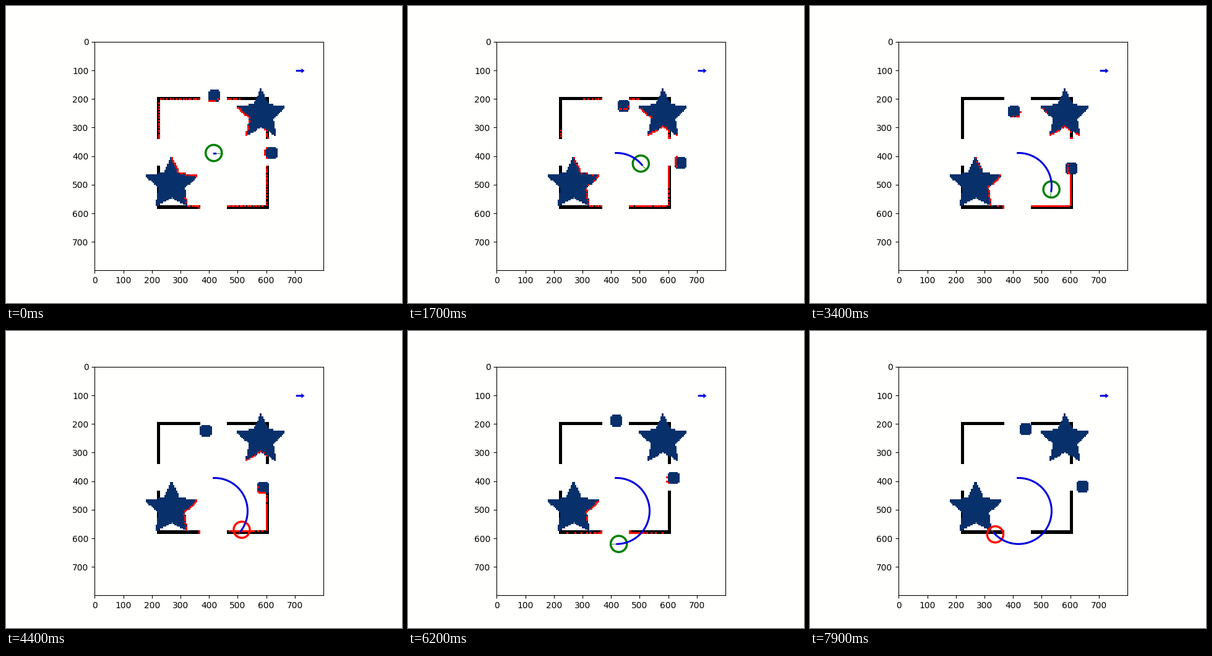
A matplotlib script for the animation above (8 s loop, 640 px wide and 480 px high).

```python
import numpy as np
import matplotlib.pyplot as plt
from matplotlib.animation import FuncAnimation
from matplotlib.patches import Circle, FancyArrow
from matplotlib.path import Path

FRAMES, STEP_MS = 80, 100
CELL, N = 5, 160                      # map cell size and cells per side
NAVY, BLUE, GREEN, RED = "#08306b", "#0000dc", "#008000", "#ff0d00"

TURN, SPEED = 0.05, 5.775             # robot: radians and units per step
ROBOT_R, REACH, RAYS = 28.3, 300, 180
SENSOR = np.array([0, -5])

gx, gy = np.meshgrid(np.arange(N) * CELL, np.arange(N) * CELL)


def star(cx, cy, outer, inner):
    a = np.arange(10) * np.pi / 5
    r = np.where(np.arange(10) % 2, inner, outer)
    path = Path(np.column_stack([cx + r * np.sin(a), cy - r * np.cos(a)]))
    pts = np.column_stack([gx.ravel(), gy.ravel()])
    return path.contains_points(pts, radius=1.0).reshape(N, N)


def make_walls():
    w = np.zeros((N, N), bool)
    for rows in (slice(39, 41), slice(115, 117)):
        w[rows, 44:74] = w[rows, 93:122] = True
    for cols in (slice(44, 46), slice(120, 122)):
        w[39:68, cols] = w[87:117, cols] = True
    return w


walls = make_walls()
stars = star(581, 254, 91, 44) | star(268, 496, 97, 47)


def discs(k):
    """Two round obstacles circling in step, snapped to the map cells."""
    a = 0.1 * (k + 1)
    out = np.zeros((N, N), bool)
    for shift in (0, 200):
        x = 414.7 + shift + 30 * np.sin(a)
        y = 215 + shift - 30 * np.cos(a)
        x, y = (np.floor(v / CELL) * CELL + CELL / 2 for v in (x, y))
        out |= np.hypot(gx - x, gy - y) < 22
    return out


heads = TURN * np.arange(FRAMES + 1)
moves = SPEED * np.column_stack([np.cos(heads), np.sin(heads)])
track = np.array([416.3, 389]) + np.vstack([[0, 0], np.cumsum(moves, axis=0)])

angles = np.arange(RAYS) * 2 * np.pi / RAYS
dist = np.arange(0, REACH, 1.0)
ray_x, ray_y = np.outer(np.cos(angles), dist), np.outer(np.sin(angles), dist)


def scan(pos, solid):
    """First solid cell met by each ray; blind when inside an obstacle."""
    x, y = pos + SENSOR
    i = np.clip(np.floor((x + ray_x) / CELL + 0.5).astype(int), 0, N - 1)
    j = np.clip(np.floor((y + ray_y) / CELL + 0.5).astype(int), 0, N - 1)
    hit = solid[j, i]
    seen = np.zeros((N, N), bool)
    if hit[0, 0]:
        return seen
    rows = np.flatnonzero(hit.any(axis=1))
    first = hit[rows].argmax(axis=1)
    seen[j[rows, first], i[rows, first]] = True
    return seen


fig, ax = plt.subplots(figsize=(6.4, 4.8), dpi=100, facecolor="#fffffd")
ax.set_facecolor("#fffffd")
ax.set_aspect("equal")
ax.set_xlim(-0.5, 799.5)
ax.set_ylim(799.5, -0.5)
ax.set_xticks(range(0, 800, 100))
ax.set_yticks(range(0, 800, 100))


def cells(mask, color, z):
    """Three-pixel squares, one for each marked cell."""
    return ax.plot(gx[mask], gy[mask], "s", ms=2.16, mew=0, color=color, zorder=z)[0]


cells(walls & ~stars, "black", 2)
cells(stars, NAVY, 2.1)
disc_dots = cells(discs(0), NAVY, 2.2)
seen_dots = cells(discs(0), RED, 2.3)

ax.add_patch(FancyArrow(704, 101.5, 30, 0, width=6.5, head_width=17, head_length=11,
                        length_includes_head=True, color=BLUE, lw=0))
body = ax.add_patch(Circle(track[0], ROBOT_R, fill=False, lw=2.5, zorder=3))
nose, = ax.plot([], [], lw=0.8, alpha=0.8, zorder=3)
trail, = ax.plot([], [], color=BLUE, lw=2.2, zorder=4)


def update(k):
    moving = discs(k)
    seen = scan(track[k], walls | stars | discs(k - 1))
    disc_dots.set_data(gx[moving], gy[moving])
    seen_dots.set_data(gx[seen], gy[seen])

    x, y = track[k]
    solid = walls | stars | moving
    crash = np.hypot(gx[solid] - x, gy[solid] - y).min() < ROBOT_R
    color = RED if crash else GREEN
    body.center = x, y
    body.set_edgecolor(color)
    nose.set_data([x, x + ROBOT_R * np.cos(heads[k])],
                  [y, y + ROBOT_R * np.sin(heads[k])])
    nose.set_color(color)
    trail.set_data(track[:k + 2, 0], track[:k + 2, 1])
    return disc_dots, seen_dots, body, nose, trail


anim = FuncAnimation(fig, update, frames=FRAMES, interval=STEP_MS,
                     repeat=True, repeat_delay=0, blit=False)
plt.show()
```
